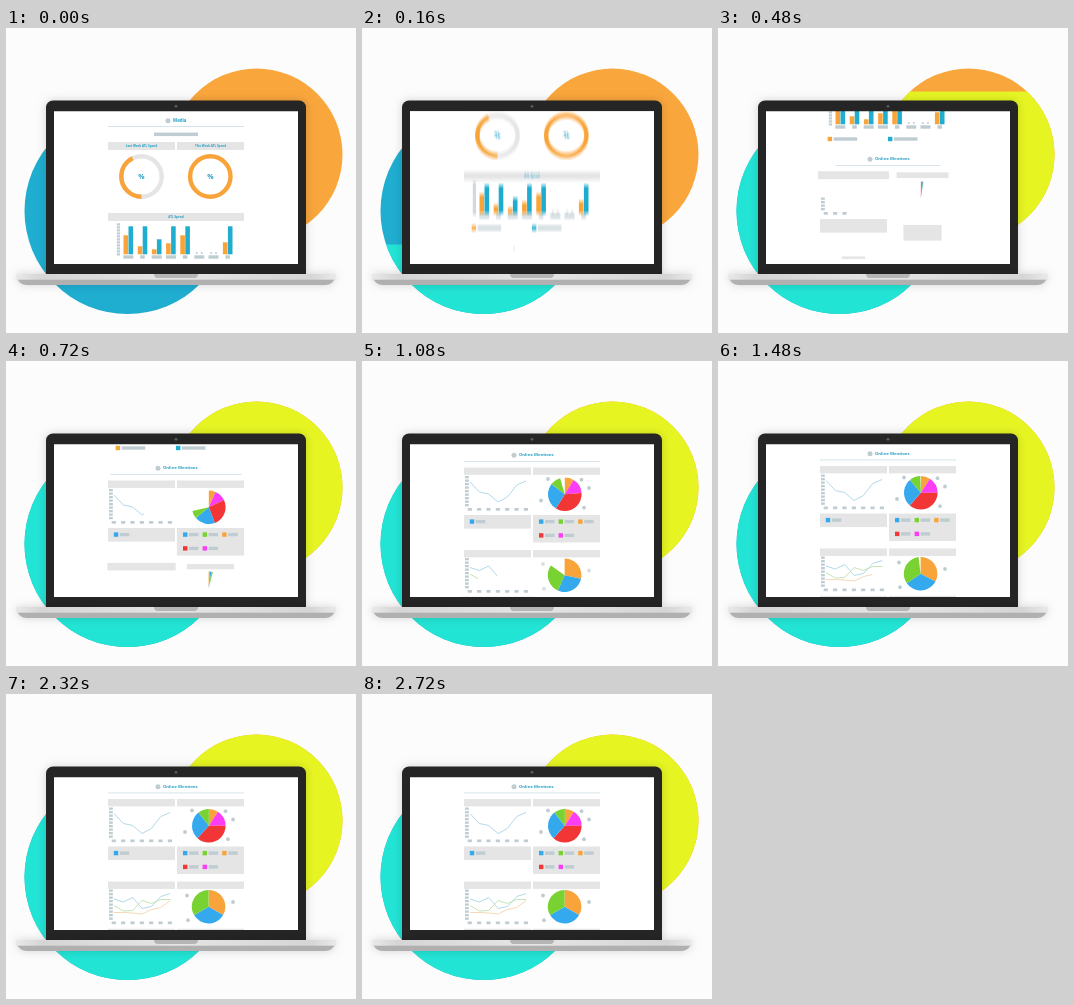
An HTML page with a canvas for the animation above (2760 ms loop, 350x305 px).

```html
<!DOCTYPE html>
<html lang="en">
<head>
<meta charset="utf-8">
<title>Dashboard on a laptop</title>
<style>
  html, body { margin: 0; width: 100%; height: 100%; overflow: hidden; background: #fcfcfc; }
  canvas { display: block; width: 350px; height: 305px; }
</style>
</head>
<body>
<canvas id="stage" width="350" height="305"></canvas>
<script>
const LOOP = 2760, STEP = 40;
const ORANGE = '#f9a43a', BLUE = '#1fadd0', TEXT = '#229fc4', GREY = '#bfcdd3', PANEL = '#e5e5e5';
const PIE_BLUE = '#35a9ee', GREEN = '#78d232', RED = '#f23535', PINK = '#fb3df5';

const stage = document.getElementById('stage').getContext('2d');
const pageCanvas = document.createElement('canvas');
pageCanvas.width = 350;
pageCanvas.height = 305;
const page = pageCanvas.getContext('2d');

const clamp = x => Math.max(0, Math.min(1, x));
const ramp = (t, start, length) => clamp((t - start) / length);
const settle = (t, start, tau = 195) => t < start ? 0 : 1 - Math.exp((start - t) / tau);

function backOut(x) {
  const u = x - 1;
  return x <= 0 ? 0 : 1 + 2.7 * u ** 3 + 1.7 * u ** 2;
}
const pop = (t, start) => backOut(ramp(t, start, 300));

// time, offset, speed
const scrollKeys = [
  [0, 0, .2], [160, 41, .3], [480, 130, .17],
  [720, 154, .06], [1080, 167, .008], [1240, 168.5, 0]
];

function scrollAt(t) {
  const i = scrollKeys.findIndex(k => k[0] > t);
  if (i < 0) return 168.5;
  const [t0, p0, v0] = scrollKeys[i - 1], [t1, p1, v1] = scrollKeys[i];
  const d = t1 - t0, u = (t - t0) / d, w = 1 - u;
  return p0 * (1 + 2 * u) * w * w + v0 * d * u * w * w
       + p1 * u * u * (3 - 2 * u) - v1 * d * u * u * w;
}

function rect(c, x, y, w, h, color) {
  c.fillStyle = color;
  c.fillRect(x, y, w, h);
}

function disc(c, x, y, r, color) {
  c.fillStyle = color;
  c.beginPath();
  c.arc(x, y, r, 0, 7);
  c.fill();
}

function label(text, x, y, size, align = 'center') {
  page.font = `bold ${size}px "Open Sans", sans-serif`;
  page.textAlign = align;
  page.textBaseline = 'middle';
  page.fillStyle = TEXT;
  page.fillText(text, x, y);
}

function panel(x, y, w, h, scale = 1) {
  const pw = w * scale, ph = h * scale;
  rect(page, x + (w - pw) / 2, y + (h - ph) / 2, pw, ph, PANEL);
}

function legend(x, y, color, width) {
  rect(page, x, y - 2.2, 4.4, 4.4, color);
  rect(page, x + 6, y - 1.7, width, 3.4, GREY);
}

function ring(x, y, from, to, color) {
  page.strokeStyle = color;
  page.lineWidth = 4.4;
  page.beginPath();
  page.arc(x, y, 20.2, from, to);
  page.stroke();
}

function pie(x, y, slices, progress) {
  let from = -Math.PI / 2;
  for (const [degrees, color] of slices) {
    const to = from + degrees * Math.PI / 180 * progress;
    page.fillStyle = color;
    page.beginPath();
    page.moveTo(x, y);
    page.arc(x, y, 16.8, from, to);
    page.fill();
    from = to;
  }
}

function lineGraph(y, heights, color, progress) {
  if (!progress) return;
  page.save();
  page.beginPath();
  page.rect(108, y - 5, 57 * progress, 50);
  page.clip();
  page.beginPath();
  heights.forEach((h, i) => page.lineTo(108 + i * 9.35, y + h));
  page.strokeStyle = color;
  page.lineWidth = .9;
  page.stroke();
  page.restore();
}

function axes(y, t, start) {
  const shown = ramp(t, start, 180);
  for (let i = 0; i < 9; i++) {
    if (i / 9 < shown) rect(page, 103, y + 28 - i * 3.5, 3.8, 2.3, GREY);
  }
  for (let i = 0; i < 7; i++) {
    if (i / 7 < shown) rect(page, 105.7 + i * 9.35, y + 32, 4.2, 2.7, GREY);
  }
}

function markers(points, alpha) {
  page.globalAlpha = alpha;
  for (const [x, y] of points) disc(page, x, y, 1.9, GREY);
  page.globalAlpha = 1;
}

function drawSpend() {
  disc(page, 162, 92.7, 2.5, GREY);
  label('Media', 167, 92.8, 4.4, 'left');
  rect(page, 102, 98, 136, .8, '#cddde6');
  rect(page, 148, 104.6, 44, 3.5, GREY);
  panel(102, 114, 67, 8);
  panel(171, 114, 67, 8);
  label('Last Week ATL Spend', 135.5, 118, 3);
  label('This Week ATL Spend', 204.5, 118, 3);
  ring(135.5, 148.5, 0, 7, '#e5e5e5');
  ring(135.5, 148.5, Math.PI / 2, 4.26, ORANGE);
  ring(204.3, 148.5, 0, 7, ORANGE);
  label('%', 135.5, 148.7, 7);
  label('%', 204.3, 148.7, 7);

  panel(102, 185, 136, 8);
  label('ATL Spend', 170, 189, 3);
  for (let i = 0; i < 11; i++) rect(page, 110.8, 195.3 + i * 3, 3.2, 2.2, GREY);
  const bars = [[19, 28], [8, 28], [5, 15], [11, 28], [19, 28], null, null, [12, 28]];
  bars.forEach((pair, i) => {
    const x = 117.5 + i * 14.2;
    if (pair) {
      rect(page, x, 226.3 - pair[0], 4.6, pair[0], ORANGE);
      rect(page, x + 5, 226.3 - pair[1], 4.6, pair[1], BLUE);
    } else {
      disc(page, x + 2.3, 225, 1, GREY);
      disc(page, x + 7.3, 225, 1, GREY);
    }
    const w = [1, 4, 7].includes(i) ? 4.5 : 10;
    rect(page, x + 4.8 - w / 2, 227.3, w, 3.4, GREY);
  });
  legend(109.7, 241, ORANGE, 23.5);
  legend(170, 241, BLUE, 23.5);
}

function drawMentions(t) {
  disc(page, 152, 261.3, 2.5 * pop(t, 135), GREY);
  page.globalAlpha = ramp(t, 200, 160);
  label('Online Mentions', 157, 261.4, 4.2, 'left');
  page.globalAlpha = 1;
  const rule = 136 * settle(t, 290, 130);
  rect(page, 170 - rule / 2, 267, rule, .8, '#cddde6');

  panel(102, 273.5, 67, 7.4, pop(t, 348));
  panel(171, 273.5, 67, 7.4, pop(t, 411));
  axes(282, t, 410);
  lineGraph(282, [6, 16, 18, 26, 21, 9, 5], '#a9d5e8', ramp(t, 500, 420));
  pie(202.8, 300.3, [[33, ORANGE], [57, PINK], [132, RED], [100, PIE_BLUE], [38, GREEN]], settle(t, 475));
  markers([[186, 285], [219.5, 285.7], [227, 294], [222, 313.7], [179, 306.5]], ramp(t, 840, 160));

  panel(102, 321, 67, 13.6, pop(t, 369));
  panel(171, 321, 67, 27.5, pop(t, 435));
  page.globalAlpha = ramp(t, 540, 130);
  legend(107.8, 327.6, PIE_BLUE, 9.5);
  [PIE_BLUE, GREEN, ORANGE, RED, PINK].forEach((color, i) =>
    legend(177 + (i % 3) * 19.6, i < 3 ? 327.6 : 341.4, color, 9.5));
  page.globalAlpha = 1;

  panel(102, 356, 67, 7.4, pop(t, 455));
  panel(171, 356, 67, 7.4, pop(t, 660));
  axes(364, t, 760);
  lineGraph(364, [9.5, 12.5, 8, 19, 17, 7, 4], '#a9d5e8', ramp(t, 880, 420));
  lineGraph(364, [16, 21.5, 21, 11, 14, 10, 10], '#bfe0ad', ramp(t, 1020, 420));
  lineGraph(364, [23, 23, 23.5, 24.5, 20, 18, 11], '#f3d3b0', ramp(t, 1140, 420));
  pie(202.6, 381.2, [[120, ORANGE], [120, PIE_BLUE], [120, GREEN]], settle(t, 712));
  markers([[181, 370], [227, 376.5], [182, 394.7]], ramp(t, 980, 160));
  panel(102, 403.3, 67, 13, pop(t, 900));
  panel(171, 403.3, 67, 13, pop(t, 960));
}

function drawPage(t, scroll) {
  rect(page, 0, 0, 350, 305, '#fff');
  page.save();
  page.translate(0, -scroll);
  drawSpend();
  drawMentions(t);
  page.restore();
}

function drawBackdrop(t) {
  const edge = 293 - .478 * t;
  const circles = (left, right) => {
    disc(stage, 250.5, 126.5, 86, right);
    disc(stage, 121.5, 183, 103, left);
  };
  rect(stage, 0, 0, 350, 305, '#fcfcfc');
  circles(BLUE, '#f9a63c');
  stage.save();
  stage.beginPath();
  stage.rect(0, edge, 350, 1600);
  stage.clip();
  circles('#22e4d5', '#e6f522');
  stage.restore();
}

function rounded(x, y, w, h, radii, fill) {
  stage.fillStyle = fill;
  stage.beginPath();
  stage.roundRect(x, y, w, h, radii);
  stage.fill();
}

function drawLaptop() {
  stage.save();
  stage.shadowColor = 'rgba(0,0,0,.16)';
  stage.shadowBlur = 9;
  rounded(40, 72.5, 260, 174, [7, 7, 0, 0], '#252525');
  rounded(10, 246, 320, 11, [0, 0, 18, 18], '#b0b0b0');
  stage.restore();
  const metal = stage.createLinearGradient(10, 0, 330, 0);
  metal.addColorStop(0, '#e9e9e9');
  metal.addColorStop(.08, '#d5d5d5');
  metal.addColorStop(.5, '#e5e5e5');
  metal.addColorStop(.92, '#d5d5d5');
  metal.addColorStop(1, '#e9e9e9');
  rect(stage, 10, 246, 320, 5.7, metal);
  rounded(148, 246, 44, 4, [0, 0, 4, 4], '#b5b5b5');
  disc(stage, 170, 78.3, 1.4, '#555b5e');
}

function drawScreen(t) {
  const scroll = scrollAt(t);
  const smear = t < 400 ? 5 * Math.sin(Math.PI * t / 400) : 0;
  const samples = smear > .5 ? 5 : 1;
  stage.save();
  stage.beginPath();
  stage.rect(48, 83.3, 244, 152.7);
  stage.clip();
  for (let i = 0; i < samples; i++) {
    const shift = samples > 1 ? (i / (samples - 1) - .5) * smear : 0;
    drawPage(t, scroll + shift);
    stage.globalAlpha = 1 / (i + 1);
    stage.drawImage(pageCanvas, 0, 0);
  }
  stage.restore();
}

function frame() {
  const t = Math.floor(performance.now() % LOOP / STEP) * STEP;
  drawBackdrop(t);
  drawLaptop();
  drawScreen(t);
  requestAnimationFrame(frame);
}
frame();
</script>
</body>
</html>
```
